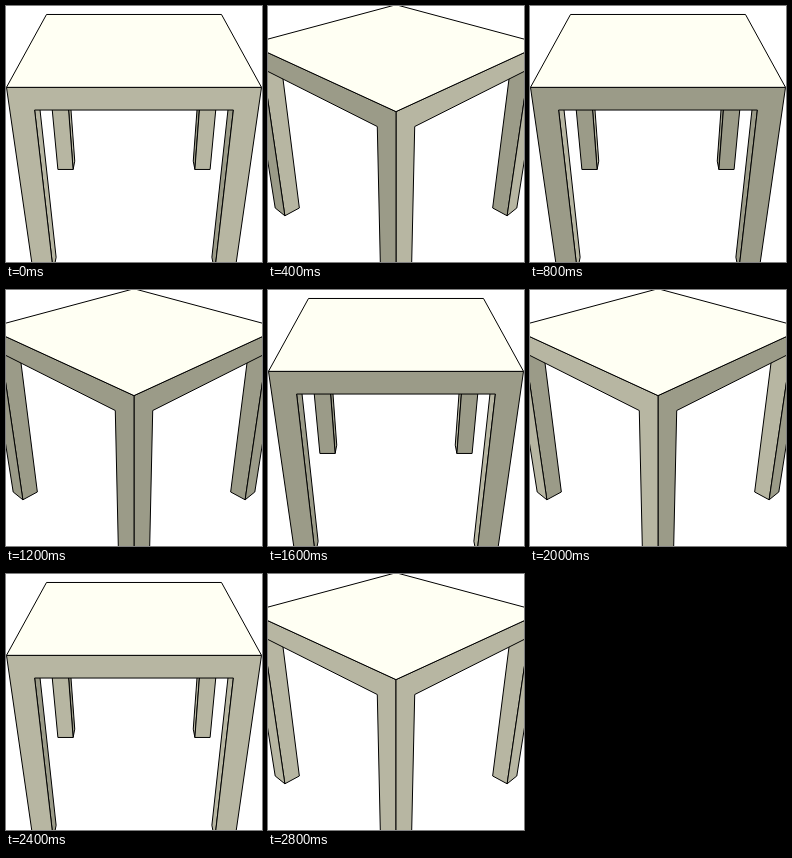
These frames come from a looping animation (256x256 px, 3200 ms). An HTML page with a canvas:

```html
<!DOCTYPE html>
<html>
<head>
<meta charset="utf-8">
<style>
  html, body { margin: 0; width: 100%; height: 100%; overflow: hidden; background: #fff; }
  canvas { display: block; width: 256px; height: 256px; }
</style>
</head>
<body>
<canvas id="stage" width="256" height="256"></canvas>
<script>
const ctx = document.getElementById('stage').getContext('2d');

const STEP_MS = 400, STEPS = 8;
const LIGHT = '#b7b6a2', DARK = '#9b9b88', TOP = '#fffff3';
const SIDES = [LIGHT, DARK, DARK, LIGHT];

// The table fills a unit cube
const HALF = 0.5, INNER = 0.4, APRON = 0.1, HEIGHT = 1;

// Camera looks down 30 degrees at the middle of the cube
const FOCAL = 483, DIST = 2.577;
const SIN = Math.sin(Math.PI / 6), COS = Math.cos(Math.PI / 6);

function project(x, drop, z) {
  const y = drop - HEIGHT / 2;
  const depth = DIST - z * COS + y * SIN;
  const scale = FOCAL / depth;
  return { x: 128 + x * scale, y: 128 + (z * SIN + y * COS) * scale, depth };
}

// Places [across, drop] pairs on the plane that faces angle a at distance out
function onSide(a, out, pairs) {
  const s = Math.sin(a), c = Math.cos(a);
  return pairs.map(([u, drop]) => project(s * out + c * u, drop, c * out - s * u));
}

function facesCamera(pts) {
  let area = 0;
  pts.forEach((p, i) => {
    const q = pts[(i + 1) % pts.length];
    area += p.x * q.y - q.x * p.y;
  });
  return area > 1;
}

const meanDepth = pts => pts.reduce((sum, p) => sum + p.depth, 0) / pts.length;

function fillShape(pts, color) {
  ctx.beginPath();
  pts.forEach(p => ctx.lineTo(p.x, p.y));
  ctx.closePath();
  ctx.fillStyle = color;
  ctx.fill();
  ctx.stroke();
}

const legFace = (u0, u1) => [[u0, APRON], [u1, APRON], [u1, HEIGHT], [u0, HEIGHT]];

const OUTER = [
  [-HALF, 0], [HALF, 0], [HALF, HEIGHT], [INNER, HEIGHT],
  [INNER, APRON], [-INNER, APRON], [-INNER, HEIGHT], [-HALF, HEIGHT]
];

function drawTable(turn) {
  ctx.fillStyle = '#fff';
  ctx.fillRect(0, 0, 256, 256);
  ctx.strokeStyle = '#000';
  ctx.lineWidth = 1;
  ctx.lineJoin = 'round';

  const inner = [], outer = [];
  SIDES.forEach((color, k) => {
    const a = turn - k * Math.PI / 2;
    inner.push({ color, pts: onSide(a, -INNER, legFace(-HALF, -INNER)) });
    inner.push({ color, pts: onSide(a, -INNER, legFace(INNER, HALF)) });
    outer.push({ color, pts: onSide(a, HALF, OUTER) });
  });

  for (const group of [inner, outer]) {
    group.filter(f => facesCamera(f.pts))
      .sort((f, g) => meanDepth(g.pts) - meanDepth(f.pts))
      .forEach(f => fillShape(f.pts, f.color));
  }

  const corners = SIDES.map((_, k) => onSide(turn - k * Math.PI / 2, HALF, [[HALF, 0]])[0]);
  fillShape(corners, TOP);
}

function frame() {
  const step = Math.floor(performance.now() / STEP_MS) % STEPS;
  drawTable(step * Math.PI / 4);
  requestAnimationFrame(frame);
}
frame();
</script>
</body>
</html>
```
